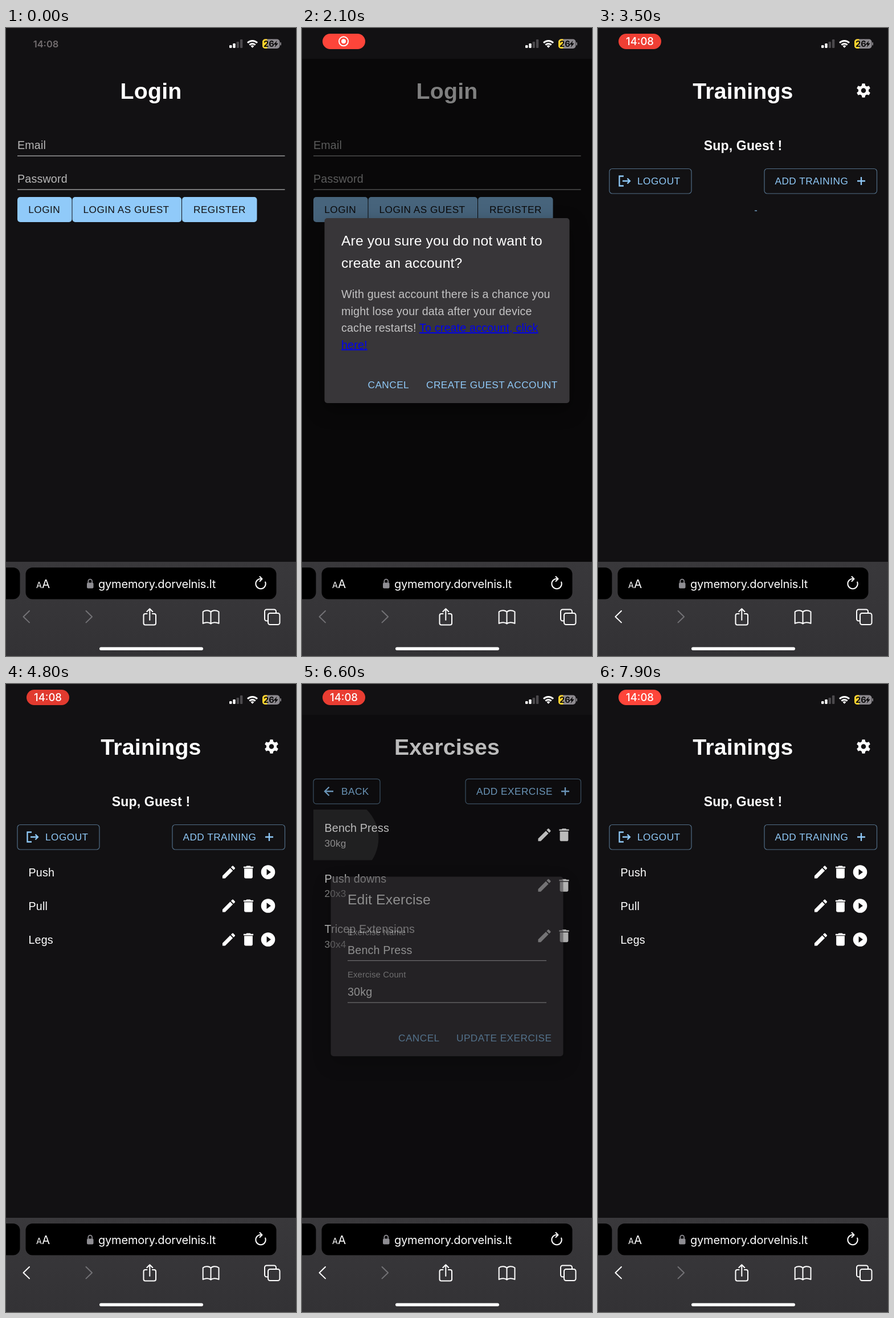
An HTML page for the animation above (8000 ms loop, 509 by 1100 pixels).

```html
<!DOCTYPE html>
<html lang="en">
<head>
<meta charset="utf-8">
<title>Workout log</title>
<style>
  html, body { margin: 0; width: 100%; height: 100%; overflow: hidden; background: #121113; }
  svg { display: block; width: 509px; height: 1100px; }
  text { font: 19.67px "Liberation Sans", Arial, sans-serif; letter-spacing: .18px; fill: #fff; white-space: pre; }
  .h1 { font-size: 39.3px; font-weight: 700; text-anchor: middle; }
  .h3 { font-size: 23px; font-weight: 700; text-anchor: middle; }
  .h2 { font-size: 24.6px; }
  .soft { fill-opacity: .7; }
  .small { font-size: 17.2px; fill-opacity: .7; }
  .label { font-size: 14.75px; fill-opacity: .7; }
  .btn { font-size: 17.2px; letter-spacing: .49px; fill: #90caf9; }
  .dark { fill: #121113; }
  .link { fill: #00e; fill-opacity: 1; text-decoration: underline; }
  .ui { font-family: Inter, sans-serif; letter-spacing: 0; }
  .line { fill: none; stroke: #fff; stroke-width: 2; stroke-linecap: round; stroke-linejoin: round; }
  .icon { fill: none; stroke: #90caf9; stroke-width: 2.3; }
  .box { fill: none; stroke: #90caf9; stroke-opacity: .5; stroke-width: 1.2; }
  .paper { fill: #383639; filter: drop-shadow(0 12px 16px rgba(0, 0, 0, .4)); }
</style>
</head>
<body>
<svg id="stage" viewBox="0 0 509 1100"></svg>
<script>
const LOOP = 8000;
const PAGE_TOP = 54, PAGE_HEIGHT = 881;

// Markup helpers
const text = (x, y, s, cls = '') => `<text x="${x}" y="${y}" class="${cls}">${s}</text>`;
const rect = (x, y, w, h, r, attrs = '') =>
  `<rect x="${x}" y="${y}" width="${w}" height="${h}" rx="${r}" ${attrs}/>`;
const path = (d, cls = 'line', attrs = '') => `<path d="${d}" class="${cls}" ${attrs}/>`;
const group = (id, body, attrs = '') => `<g id="${id}" ${attrs}>${body}</g>`;
const rule = (x, y, w) => rect(x, y - .6, w, 1.2, 0, 'fill="#fff" fill-opacity=".7"');
const solid = (x, w, tx, s) => rect(x, 296, w, 44, 5, 'fill="#90caf9"') + text(tx, 324, s, 'btn dark');
const outlined = (x, y, w, tx, s) => rect(x, y, w, 43.5, 5, 'class="box"') + text(tx, y + 27.7, s, 'btn');
const plus = y => path(`M455 ${y}h14m-7-7v14`, 'icon');
const backdrop = id => rect(0, PAGE_TOP, 509, PAGE_HEIGHT, 0, `id="${id}"`);

const glyphs = {
  pencil: 'M3 17.25V21h3.75L17.81 9.94l-3.75-3.75zM20.71 7.04c.39-.39.39-1.02 0-1.41l-2.34-2.34c-.39-.39-1.02-.39-1.41 0l-1.83 1.83 3.75 3.75z',
  trash: 'M6 19c0 1.1.9 2 2 2h8c1.1 0 2-.9 2-2V7H6zM19 4h-3.5l-1-1h-5l-1 1H5v2h14z',
  play: 'M12 2a10 10 0 1 0 0 20a10 10 0 1 0 0-20zM10 16.5v-9l6 4.5z'
};
const glyph = (name, x, y) => path(glyphs[name], '',
  `fill="#fff" fill-rule="evenodd" transform="translate(${x} ${y}) scale(1.229) translate(-12 -12)"`);

const gear = `<g transform="translate(466 109.5)" fill="#fff">
  <circle r="6.7" fill="none" stroke="#fff" stroke-width="4.8"/>
  ${[0, 60, 120, 180, 240, 300].map(a => `<path d="M-3.6-7L-2.4-12.2H2.4L3.6-7z" transform="rotate(${a})"/>`).join('')}</g>`;

const loginPage = group('login',
  text(254.5, 123.5, 'Login', 'h1') +
  text(20, 211.5, 'Email', 'soft') + rule(20, 224, 469.5) +
  text(20, 270.5, 'Password', 'soft') + rule(20, 283, 469.5) +
  solid(20, 95.5, 39.3, 'LOGIN') + solid(116.5, 191.5, 135.5, 'LOGIN AS GUEST') + solid(309, 131.5, 329, 'REGISTER') +
  '<circle id="tapGuest" cx="171" cy="317" clip-path="url(#guestClip)"/>' +
  backdrop('guestShade') +
  group('guestDialog',
    rect(39.5, 333, 430, 324, 5, 'class="paper"') +
    text(69, 381, 'Are you sure you do not want to', 'h2') + text(69, 420, 'create an account?', 'h2') +
    text(69, 473, 'With guest account there is a chance you', 'soft') +
    text(69, 502.5, 'might lose your data after your device', 'soft') +
    text(69, 532, 'cache restarts! <tspan class="link">To create account, click</tspan>', 'soft') +
    text(69, 561.5, 'here!', 'link') +
    text(115.5, 631, 'CANCEL', 'btn') + text(218, 631, 'CREATE GUEST ACCOUNT', 'btn')));

const trainingsPage = group('trainings',
  text(254.5, 123.5, 'Trainings', 'h1') + gear +
  text(254.5, 213.5, 'Sup, Guest !', 'h3') +
  outlined(20, 246.5, 144, 69, 'LOGOUT') +
  path('M45 259.5h-7.5v17h7.5M43 268h13m-4.5-4.5l4.5 4.5l-4.5 4.5', 'icon') +
  outlined(292, 246.5, 197.5, 310.5, 'ADD TRAINING') + plus(268) +
  group('trainingList', ['Push', 'Pull', 'Legs'].map((name, i) => {
    const y = 329.5 + i * 59;
    return text(39.5, y + 7.3, name) + glyph('pencil', 391, y) + glyph('trash', 425.5, y) + glyph('play', 460, y);
  }).join('')));

const exercises = [['Bench Press', '30kg'], ['Push downs', '20x3'], ['Tricep Extensions', '30x4']];
const exercisesPage = group('exercises',
  text(254.5, 123.5, 'Exercises', 'h1') +
  outlined(20, 166.3, 117, 69, 'BACK') + path('M55 188H40m7.5-7.5L40 188l7.5 7.5', 'icon') +
  outlined(287, 166.3, 202.5, 306, 'ADD EXERCISE') + plus(188) +
  '<circle id="tapRow" cx="64" cy="270" fill="#fff" clip-path="url(#rowClip)"/>' +
  group('exerciseList', exercises.map(([name, count], i) => {
    const y = 264.3 + i * 88.4;
    return text(39.5, y - 5, name) + text(39.5, y + 20.7, count, 'small') +
      glyph('pencil', 425.5, y) + glyph('trash', 460, y);
  }).join('')) +
  backdrop('editShade') +
  group('editDialog',
    rect(50.5, 337.5, 408, 314.5, 5, 'class="paper"') +
    text(80, 386, 'Edit Exercise', 'h2') +
    text(80, 440, 'Exercise Name', 'label') + text(80, 472.5, 'Bench Press') + rule(80, 484.5, 349) +
    text(80, 514, 'Exercise Count', 'label') + text(80, 546, '30kg') + rule(80, 558, 349) +
    text(169, 626, 'CANCEL', 'btn') + text(271, 626, 'UPDATE EXERCISE', 'btn')));

const statusBar =
  rect(0, 0, 509, PAGE_TOP, 0, 'fill="#121113"') +
  text(70, 34, '14:08', 'ui" id="clock" text-anchor="middle" style="font-size:16.5px;font-weight:600;fill:#716c6e') +
  group('pill',
    rect(36, 10, 75, 27, 13.5, 'id="pillBody"') +
    group('record', '<circle cx="73" cy="23.3" r="8" class="line"/><circle cx="73" cy="23.3" r="4" fill="#fff"/>') +
    text(73.5, 30, '14:08', 'ui" id="pillTime" text-anchor="middle" style="font-size:18.5px;font-weight:500')) +
  [5, 8, 11, 15].map((h, i) => rect(392 + i * 6.3, 35 - h, 4.4, h, 1.2, `fill="${i < 2 ? '#fff' : '#4b494c'}"`)).join('') +
  path('M424 26a12 12 0 0 1 17 0M427.4 29.6a7.2 7.2 0 0 1 10.2 0', '', 'fill="none" stroke="#fff" stroke-width="3"') +
  path('M432.5 34.7l-2.9-2.9a4.1 4.1 0 0 1 5.8 0z', '', 'fill="#fff"') +
  rect(450, 19.5, 30.5, 16.5, 5, 'fill="#8d8a8f"') +
  path('M458.3 19.5h-3.3a5 5 0 0 0-5 5v6.5a5 5 0 0 0 5 5h3.3z', '', 'fill="#fcd32c"') +
  rect(481.2, 25, 1.8, 5.5, .9, 'fill="#8d8a8f"') +
  text(461.3, 33, '26', 'ui" text-anchor="middle" style="font-size:14.5px;font-weight:700;fill:#0c0b0c') +
  path('M475.5 22l-6 7h3.6l-1.4 5l6.1-7.2h-3.7z', '', 'fill="#0c0b0c"');

const browserBar =
  rect(0, 935, 509, 165, 0, 'fill="url(#barFill)"') +
  rect(-20, 945, 44.5, 55.5, 12) + rect(34.5, 945, 440, 55.5, 12) +
  text(53, 980.5, 'A<tspan style="font-size:20.5px">A</tspan>', 'ui" style="font-size:14.5px') +
  rect(142, 971.5, 11.5, 10, 2, 'fill="#8e8d92"') +
  path('M144.3 972v-3a3.4 3.4 0 0 1 6.8 0v3', '', 'fill="none" stroke="#8e8d92" stroke-width="1.8"') +
  text(162, 980.5, 'gymemory.dorvelnis.lt', 'ui" style="font-size:20px;letter-spacing:-.2px') +
  path('M455.2 970.5a8.7 8.7 0 1 1-7.5-5.7M445.5 961l4 4l-4 4') +
  path('M41 1021l-10.5 10.2l10.5 10.2', 'line', 'id="back"') +
  path('M140.5 1021l10.5 10.2l-10.5 10.2', 'line', 'style="stroke:#737276"') +
  path('M247.5 1026h-3a3 3 0 0 0-3 3v13.500a3 3 0 0 0 3 3h15.500a3 3 0 0 0 3-3v-13.500a3 3 0 0 0-3-3h-3M252.300 1037v-19.500m-5 4.700l5-5l5 5') +
  path('M359.500 1023v20.500c-3-3-9.500-3-13.800-.5v-20.500c4-3 11-3 13.800.5c3-3.500 9.500-3.500 14-.5v20.500c-4.500-2.500-11-2.500-14 .5') +
  path('M460 1038.500h-2.500a3.500 3.500 0 0 1-3.500-3.500v-13a3.500 3.500 0 0 1 3.500-3.500h13a3.500 3.500 0 0 1 3.500 3.500v3') +
  rect(460, 1025, 20.5, 20, 3.5, 'class="line"') +
  rect(164, 1084.5, 182, 5.5, 2.75, 'fill="#fff"');

document.getElementById('stage').innerHTML =
  `<defs>
    <clipPath id="guestClip">${rect(116.5, 296, 191.5, 44, 5)}</clipPath>
    <clipPath id="rowClip">${rect(20, 220, 469.5, 88.4, 0)}</clipPath>
    <linearGradient id="barFill" x2="0" y2="1"><stop stop-color="#39383b"/><stop offset="1" stop-color="#333235"/></linearGradient>
  </defs>` +
  rect(0, 0, 509, 1100, 0, 'fill="#121113"') +
  loginPage + trainingsPage + exercisesPage +
  '<circle id="spinner" cx="254.5" r="22.5" fill="none" stroke="#90caf9" stroke-width="4.1"/>' +
  statusBar + browserBar;

const el = {};
document.querySelectorAll('[id]').forEach(node => { el[node.id] = node; });

// Timing helpers
const bezier = (x1, y1, x2, y2) => p => {
  const at = (a, b, s) => 3 * a * s * (1 - s) ** 2 + 3 * b * s * s * (1 - s) + s ** 3;
  if (p <= 0 || p >= 1) return p <= 0 ? 0 : 1;
  let lo = 0, hi = 1;
  for (let i = 0; i < 24; i++) {
    const mid = (lo + hi) / 2;
    if (at(x1, x2, mid) < p) lo = mid; else hi = mid;
  }
  return at(y1, y2, lo);
};
const easeInOut = bezier(.4, 0, .2, 1);
const easeOut = bezier(0, 0, .2, 1);
const ramp = (t, start, length) => Math.min(1, Math.max(0, (t - start) / length));
const mix = (a, b, k) => a + (b - a) * k;
const show = (node, on) => { node.style.display = on ? '' : 'none'; };
const fade = (node, k) => { node.style.opacity = k; };

const ROUTES = [[0, 'login'], [3480, 'trainings'], [5600, 'exercises'], [7500, 'trainings']];
const LOADS = [[3480, 3700, 319.5], [5600, 5800, 239], [7500, 7700, 319.5]];

function ripple(node, t, start, radius) {
  const k = easeInOut(ramp(t, start, 550));
  node.setAttribute('r', radius * k);
  fade(node, mix(.1, .3, k) * (1 - k));
}

function drawSpinner(t) {
  const load = LOADS.find(([from, to]) => t >= from && t < to);
  show(el.spinner, load);
  if (!load) return;
  const [from, , y] = load;
  const turn = (t - from - 20) / 1400;
  const grow = easeInOut(ramp(turn, 0, .5));
  el.spinner.setAttribute('cy', y);
  el.spinner.setAttribute('stroke-dasharray', `${mix(1.1, 111, grow)} 223`);
  el.spinner.setAttribute('stroke-dashoffset', -16.7 * grow);
  el.spinner.setAttribute('transform', `rotate(${360 * Math.max(0, turn)} 254.5 ${y})`);
}

function drawPill(t) {
  const enter = ramp(t, 100, 300), swap = ramp(t, 2600, 200);
  const glow = .5 + .5 * Math.cos(t * Math.PI / 1000);
  fade(el.clock, 1 - enter);
  fade(el.pill, enter);
  fade(el.record, 1 - swap);
  fade(el.pillTime, swap);
  el.pillBody.setAttribute('fill', `rgb(${mix(222, 255, glow)} ${mix(57, 69, glow)} ${mix(46, 58, glow)})`);
}

function render(t) {
  const route = ROUTES.filter(([from]) => t >= from).pop()[1];
  for (const name of ['login', 'trainings', 'exercises']) show(el[name], name === route);
  show(el.trainingList, t < 5600 ? t >= 3700 : t >= 7700);
  show(el.exerciseList, t >= 5800);
  el.back.style.stroke = route === 'login' ? '#737276' : '#fff';

  const open = ramp(t, 1418, 225);
  show(el.guestDialog, open > 0);
  fade(el.guestShade, .5 * easeInOut(open));
  el.guestDialog.setAttribute('transform', `translate(0 ${PAGE_HEIGHT * (1 - easeOut(open))})`);
  ripple(el.tapGuest, t, 1396, 140);

  const edit = easeInOut(ramp(t, 6519, 225)) * (1 - easeInOut(ramp(t, 7050, 195)));
  fade(el.editShade, .5 * edit);
  fade(el.editDialog, edit);
  ripple(el.tapRow, t, 6482, 430);

  drawSpinner(t);
  drawPill(t);
}

const began = performance.now();
function tick() {
  render((performance.now() - began) % LOOP);
  requestAnimationFrame(tick);
}
tick();
</script>
</body>
</html>
```
